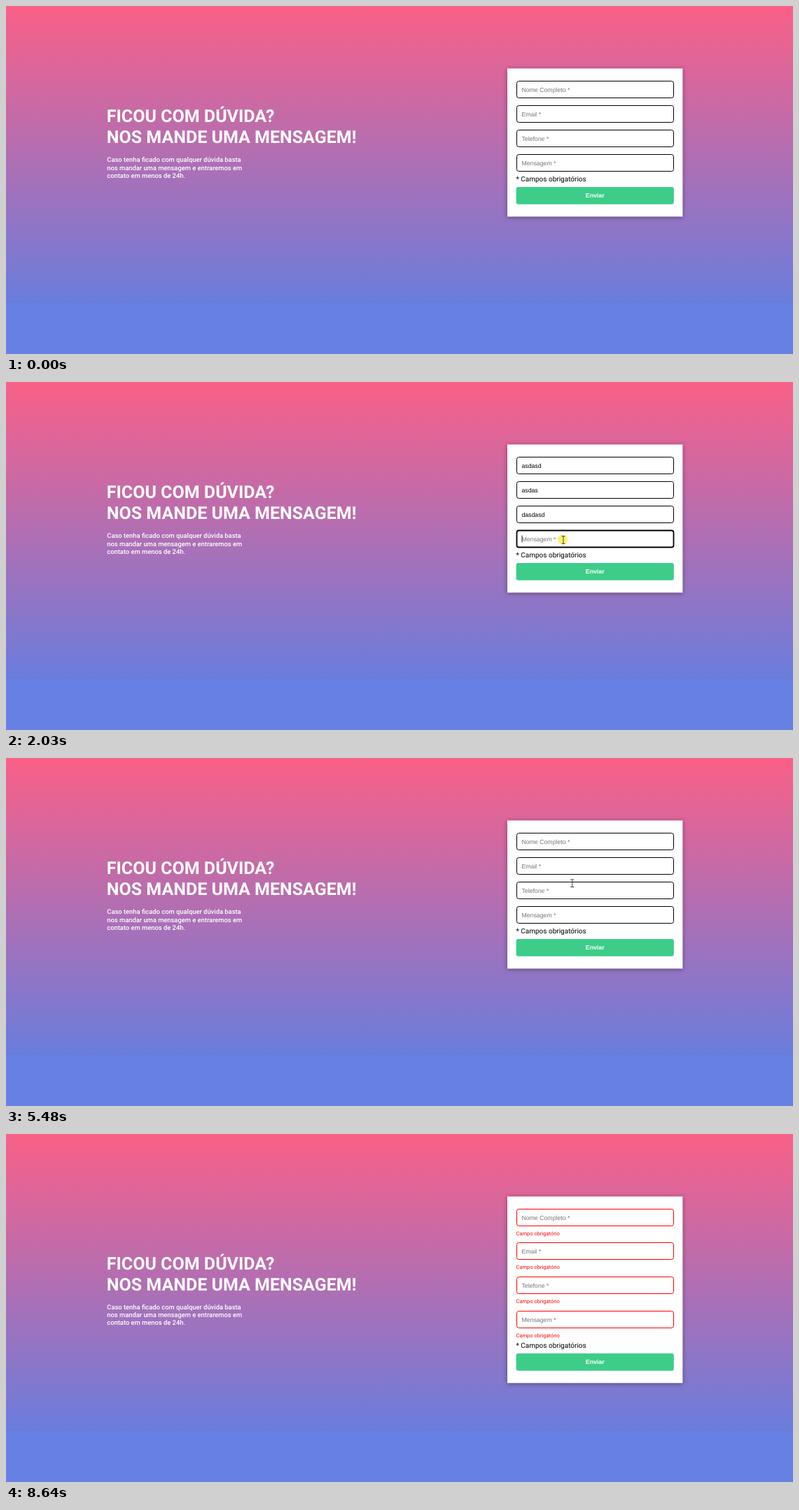
An HTML page for the animation above (8.84 s loop, 1124 by 498 pixels).

```html
<!DOCTYPE html>
<html lang="pt-BR">
<head>
<meta charset="utf-8">
<title>Formulário de contato</title>
<style>
  html, body { margin: 0; width: 100%; height: 100%; overflow: hidden; }
  body { background: linear-gradient(#fa6088, #6a7ddc 425px, #6680e4 425px); }
  svg { display: block; width: 1124px; height: 498px; }
  text { font-family: Roboto, sans-serif; text-rendering: geometricPrecision; white-space: pre; }
  .title { font-size: 25px; font-weight: 700; fill: #fff; }
  .lead { font-size: 9.375px; font-weight: 500; fill: #fff; }
  .card { fill: #fff; filter: drop-shadow(0 1px 3px rgba(0, 0, 0, .4)); }
  .value, .send { font-family: "Liberation Sans", Arial, sans-serif; font-size: 8.75px; }
  .send { font-weight: 700; fill: #fff; text-anchor: middle; }
  .error { font-size: 7.5px; fill: #f00; }
  .note { font-size: 10px; }
</style>
</head>
<body>
<svg viewBox="0 0 1124 498">
  <g id="intro">
    <text class="title" x="143.8" y="166">FICOU COM DÚVIDA?</text>
    <text class="title" x="143.8" y="196">NOS MANDE UMA MENSAGEM!</text>
    <text class="lead" x="144.3" y="223.2">Caso tenha ficado com qualquer dúvida basta</text>
    <text class="lead" x="144.3" y="234.5">nos mandar uma mensagem e entraremos em</text>
    <text class="lead" x="144.3" y="245.7">contato em menos de 24h.</text>
  </g>
  <rect id="card" class="card" x="716" y="89.4" width="250.4"/>
  <g id="fields"></g>
  <g id="footer">
    <text class="note" x="728.5" y="251.3">* Campos obrigatórios</text>
    <rect id="button" x="728.6" y="259" width="225.2" height="24.8" rx="3"/>
    <text class="send" x="841.2" y="274.4">Enviar</text>
  </g>
  <g id="cursor">
    <circle id="halo" cx="-1" cy="-.5" r="7" fill="#fbee1c" opacity=".65"/>
    <path id="arrow" d="M0 0V10L2.3 8 4 11.6 5.6 11 4.1 7.4H7Z" fill="#fff" stroke="#111" stroke-width=".8"/>
    <path id="hand" d="M-1 .8Q0-.6 1 .8V4.6L5 5.6Q6.6 6 6.3 8L5 13H-.5L-4 8.2Q-4 6.4-2.5 7L-1 8.5Z"
          fill="#fff" stroke="#111" stroke-width=".9"/>
    <path id="beam" d="M-2.5-5.3H2.5M0-5V5M-2.5 5.3H2.5" fill="none" stroke="#444"/>
  </g>
</svg>
<script>
const LOOP = 8840;
const SENT = 3050, VALID = 3160, ALERT_CLOSED = 4810, RESET = 5010, REJECTED = 6690, SETTLED = 6760;

const fields = [
  { label: 'Nome Completo *', text: 'asdasd',  click: 470,  start: 560,  step: 62 },
  { label: 'Email *',         text: 'asdas',   click: 1000, start: 1070, step: 55 },
  { label: 'Telefone *',      text: 'dasdasd', click: 1340, start: 1410, step: 65 },
  { label: 'Mensagem *',      text: 'asdsad',  click: 2000, start: 2080, step: 65 }
];

// Pointer path: time, x, y of the hot spot
const path = [
  [70, 1015, 389], [150, 975, 262], [330, 805, 97], [450, 796, 117], [930, 796, 117],
  [1000, 793, 152], [1290, 793, 152], [1340, 791, 181], [1420, 791, 181],
  [1690, 796, 257], [1830, 796, 240], [1980, 796, 226], [2400, 796, 226],
  [2600, 802, 262], [2720, 803.5, 274], [5010, 803.5, 274], [5300, 806, 220],
  [5500, 809, 175], [5750, 810, 154], [5890, 810, 154], [6150, 815.5, 259.3],
  [6360, 816, 271], [7360, 816, 271], [7630, 899, 312], [8090, 899, 312],
  [8140, 956, 313], [8640, 1098, 500]
];

const $ = id => document.getElementById(id);
const set = (el, attrs) => { for (const k in attrs) el.setAttribute(k, attrs[k]); };
const show = (el, on) => { el.style.display = on ? '' : 'none'; };

function add(parent, tag, attrs, text = '') {
  const el = document.createElementNS('http://www.w3.org/2000/svg', tag);
  set(el, attrs);
  el.textContent = text;
  return parent.appendChild(el);
}

for (const f of fields) {
  f.group = add($('fields'), 'g', {});
  f.box = add(f.group, 'rect', { x: 729.5, y: .5, width: 224, height: 24, rx: 3, fill: '#fff' });
  f.value = add(f.group, 'text', { class: 'value', x: 736.4, y: 15.5 });
  f.caret = add(f.group, 'rect', { y: 7.5, width: .8, height: 10 });
  f.error = add(f.group, 'text', { class: 'error', x: 728.5, y: 38.2 }, 'Campo obrigatório');
}

function pointerAt(t) {
  const i = path.findIndex(p => p[0] > t);
  if (i < 1) return null;
  const [t0, x0, y0] = path[i - 1], [t1, x1, y1] = path[i];
  const k = (t - t0) / (t1 - t0);
  return { x: x0 + (x1 - x0) * k, y: y0 + (y1 - y0) * k };
}

function borderColor(t) {
  if (t >= SETTLED) return '#f00';
  if (t >= REJECTED) return '#900';
  if (t >= RESET || t < SENT) return '#000';
  return t < VALID ? '#004000' : '#008000';
}

function drawField(f, i, t, top) {
  const next = fields[i + 1];
  const focused = t >= f.click && t < (next ? next.click : SENT);
  const count = t < RESET ? Math.max(0, Math.floor((t - f.start) / f.step) + 1) : 0;
  const typed = f.text.slice(0, count);
  const content = typed || f.label;
  if (f.value.textContent !== content) f.value.textContent = content;
  set(f.group, { transform: `translate(0 ${top})` });
  set(f.value, { fill: typed ? '#000' : '#757575' });
  set(f.box, { stroke: borderColor(t), 'stroke-width': focused ? 1.8 : 1 });
  set(f.caret, { x: 736.6 + (typed ? f.value.getComputedTextLength() : 0) });
  show(f.caret, focused);
  show(f.error, t >= REJECTED);
}

function drawPointer(t, pos, kind) {
  show($('cursor'), pos);
  if (!pos) return;
  set($('cursor'), { transform: `translate(${pos.x} ${pos.y})` });
  for (const id of ['arrow', 'hand', 'beam']) show($(id), id === kind);
  show($('halo'), fields.some(f => t >= f.click && t < f.click + 140));
}

function draw(t) {
  const rejected = t >= REJECTED;
  const grow = rejected ? 55 : 0;
  const tops = fields.map((_, i) => Math.floor(107 + i * (rejected ? 48.75 : 35)));
  const pos = pointerAt(t);
  const over = top => pos && pos.x > 728.5 && pos.x < 954 && pos.y > top && pos.y < top + 25;

  const settling = rejected && t < SETTLED;
  const hover = settling || over(259 + grow);
  let kind = hover ? 'hand' : tops.some(over) ? 'beam' : 'arrow';
  const alertClosed = t >= ALERT_CLOSED && t < RESET;
  if (alertClosed) kind = 'arrow';

  set($('intro'), { transform: `translate(0 ${grow / 2})` });
  set($('card'), { height: 212 + grow });
  set($('footer'), { transform: `translate(0 ${grow})` });
  set($('button'), {
    fill: hover ? '#36b074' : '#3dcd89',
    stroke: alertClosed ? '#000' : 'none',
    'stroke-width': 1.4
  });
  fields.forEach((f, i) => drawField(f, i, t, tops[i]));
  drawPointer(t, pos, kind);
}

const began = performance.now();
function tick() {
  draw((performance.now() - began) % LOOP);
  requestAnimationFrame(tick);
}
tick();
</script>
</body>
</html>
```
